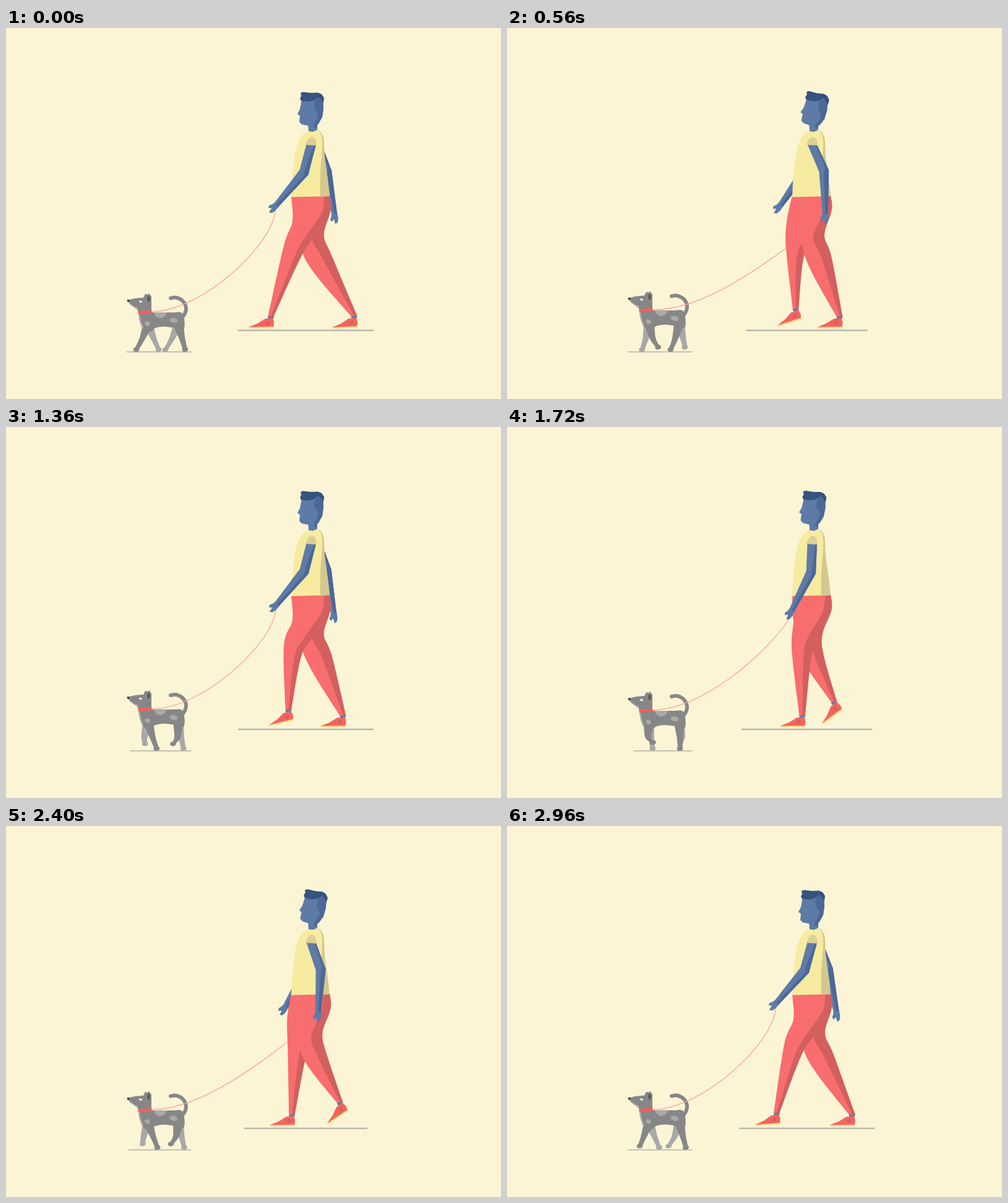
An HTML page with a canvas that plays this animation: 800 by 600 pixels, repeating every 3 s.

```html
<!DOCTYPE html>
<html lang="en">
<head>
<meta charset="utf-8">
<title>Dog walk</title>
<style>
html, body { margin: 0; width: 100%; height: 100%; overflow: hidden; background: #fcf5d5; }
canvas { display: block; }
</style>
</head>
<body>
<canvas id="stage" width="800" height="600"></canvas>
<script>
const ctx = document.getElementById('stage').getContext('2d');
const LOOP = 3000, WALK = 1500, TROT = 1000, DEG = Math.PI / 180;
const C = {
  sky: '#fcf5d5', skin: '#5e7ba6', skinDark: '#4c6898', hair: '#35537f',
  shirt: '#f6eba1', shirtDark: '#d5c88d', sleeve: '#dccf98',
  pants: '#f86d6d', pantsDark: '#d35f5f', shoe: '#f3645f', sole: '#fadb84',
  fur: '#878787', furLight: '#a8a8a7', furDark: '#555', leash: '#f8a59b'
};

const { sin, cos, PI } = Math;
const mix = (a, b, u) => a + (b - a) * u;
// Swing of arms and knees: 1 with the limb in front, -1 behind (for a leg)
const swing = p => cos(2 * PI * (p + .04));

// Foot cycle: x goes 0 to 1 on the ground, then back through the air
function step(phase, early, late) {
  const p = phase % 1, air = p >= .5, u = p * 2 % 1;
  const x = u + (air ? -late : early) * sin(PI * u);
  return { x: air ? 1 - x : x, air: air ? u : 0 };
}

// Adds a smooth curve through the points to the current path
function curve(pts, start) {
  if (start) ctx.moveTo(...pts[0]); else ctx.lineTo(...pts[0]);
  for (let i = 0; i < pts.length - 1; i++) {
    const a = pts[i], b = pts[i + 1], p = pts[i - 1] || a, q = pts[i + 2] || b;
    ctx.bezierCurveTo(a[0] + (b[0] - p[0]) / 6, a[1] + (b[1] - p[1]) / 6,
      b[0] - (q[0] - a[0]) / 6, b[1] - (q[1] - a[1]) / 6, b[0], b[1]);
  }
}
function shape(color, ...curves) {
  ctx.beginPath();
  curves.forEach((c, i) => curve(c, !i));
  ctx.closePath();
  ctx.fillStyle = color;
  ctx.fill();
}
function poly(color, pts) {
  ctx.beginPath();
  pts.forEach(p => ctx.lineTo(...p));
  ctx.closePath();
  ctx.fillStyle = color;
  ctx.fill();
}
function oval(color, x, y, rx, ry, angle = 0) {
  ctx.beginPath();
  ctx.ellipse(x, y, rx, ry, angle, 0, 7);
  ctx.fillStyle = color;
  ctx.fill();
}
function line(color, width, pts) {
  ctx.beginPath();
  curve(pts, true);
  ctx.strokeStyle = color;
  ctx.lineWidth = width;
  ctx.stroke();
}
function placed(x, y, angle, draw) {
  ctx.save();
  ctx.translate(x, y);
  ctx.rotate(angle);
  draw();
  ctx.restore();
}

function drawShoe(x, y, angle) {
  placed(x, y, angle, () => {
    poly(C.skin, [[-5, -2], [5, -2], [4, 3], [-5, 3]]);
    poly(C.sole, [[-36, 16], [4, 14], [4, 18.5], [-36, 18.5]]);
    poly(C.shoe, [[-9, 3], [-4, 3], [3, 1.5], [5, 10], [4, 16], [-36, 16.5], [-22, 11]]);
    oval(C.pantsDark, -5, 10, 3, 3);
  });
}

function drawLeg(phase, near) {
  const { x, air } = step(phase, .09, .05), s = swing(phase);
  const ax = mix(428, 563, x), ay = 467 - 23 * sin(PI * air ** .7);
  const kneeX = 485 - 23 * s, half = 17 - 3 * s;
  const front = [kneeX - half, 367 - 14 * s], back = [kneeX + half, 370];
  const pit = [507 - 7 * s, 335];
  const straight = mix(461, front[0], 39 / (front[1] - 273));
  const thigh = near ? Math.max(463, straight) : straight - 4;

  drawShoe(ax, ay, -36 * DEG * sin(PI * air ** .6));
  const rear = [[ax + 4.5, ay - 1], back, pit, [524, 297], [523, 271]];
  shape(C.pants, [[461, 271], [thigh, 312], front, [ax - 5, ay]], rear);
  shape(C.pantsDark, [[514, 271], [510, 300], [pit[0] - 18, 340],
    [mix(front[0], back[0], .6), 372], [ax, ay - 1]], rear);
}

// Angles are measured forward from straight down
function armAt(x, y, upper, fore) {
  const ex = x - 47 * sin(upper * DEG), ey = y + 47 * cos(upper * DEG);
  return { x, y, ex, ey, fore, wx: ex - 69 * sin(fore * DEG), wy: ey + 69 * cos(fore * DEG) };
}
function drawArm({ x, y, ex, ey, wx, wy, fore }) {
  const bend = Math.atan2(x - wx, wy - y), nx = 8 * cos(bend), ny = 8 * sin(bend);
  const vx = 4.5 * cos(fore * DEG), vy = 4.5 * sin(fore * DEG);
  const back = [[wx + vx, wy + vy], [ex + nx, ey + ny], [x + 7.5, y + 1]];
  placed(wx, wy, (fore + 98) * DEG, () => poly(C.skin,
    [[-3, -4.5], [7, -6], [14, -5], [17, -1], [9, 1], [13, 5], [9, 7], [4, 5], [-3, 4.5]]));
  poly(C.skin, [[x - 8, y], [ex - nx, ey - ny], [wx - vx, wy - vy], ...back]);
  poly(C.skinDark, [[x + 5, y], [ex + 2, ey - 6], [ex, ey + 5], [wx, wy], ...back]);
}

function drawHead(tilt) {
  poly(C.skin, [[488, 150], [489, 167], [496, 168], [503, 165], [503, 150]]);
  poly(C.skinDark, [[492, 158], [503, 150], [503, 163]]);
  placed(494, 161, tilt * DEG, () => {
    ctx.translate(-494, -161);
    poly(C.skin, [[478, 114], [475, 131], [471, 139], [475, 142], [474, 152],
      [478, 156], [488, 158], [498, 160], [506, 153], [511, 144], [513, 130], [512, 112], [500, 108]]);
    poly(C.skinDark, [[500, 110], [512, 112], [513, 130], [511, 144], [505, 155], [499, 160],
      [497, 157], [502, 149], [505, 139], [498, 129]]);
    poly(C.hair, [[476, 105], [480, 103.5], [493, 105], [504, 104.5], [510, 107], [514, 113], [513, 121],
      [509, 115], [504, 111], [497, 117], [488, 119], [477, 118], [475, 114], [477, 110]]);
  });
}

function drawTorso() {
  const right = [[505, 165], [513, 177], [515, 208], [520, 245], [523, 272]];
  shape(C.shirt, [[461, 273.5], [463, 238], [468, 200], [476, 177], [487, 167]],
    [[487, 167], [496, 168], [505, 165]], right);
  shape(C.shirtDark, [[508, 273], [508, 236], [511, 195], [510, 175], [505, 166]], right);
}

function drawPaw(phase, startX, reach, hipX, hipY, color, bend) {
  const { x, air } = step(phase, .25, .15), lift = 10 * sin(PI * air);
  const px = startX + reach * x, py = 520 - lift;
  const kneeX = (px + hipX) / 2 + lift * bend;
  shape(color, [[hipX - 9, hipY], [kneeX - 5, 502], [px - 4, py]],
    [[px + 3.5, py], [kneeX + 5, 502], [hipX + 8, hipY]]);
  oval(color, px - .5, py, 5, 3.8, -.15);
}

function drawDog(phase, bob) {
  const hipY = 480 + bob;
  const frontLeg = (p, color) => drawPaw(p, 211, 36, 230, hipY, color, -.5);
  const rearLeg = (p, color) => drawPaw(p, 258, 32, 279, hipY, color, .3);
  frontLeg(phase + .5, C.furLight);
  rearLeg(phase, C.furLight);
  rearLeg(phase + .5, C.fur);
  frontLeg(phase, C.fur);
  placed(0, bob, 0, () => {
    line(C.fur, 6, [[266, 437], [275, 436], [286, 442], [291, 453], [288, 464], [282, 470]]);
    shape(C.fur, [[214, 459], [216, 473], [220, 484], [226, 491], [234, 491], [242, 485], [256, 483],
      [272, 485], [287, 488], [288, 470], [283, 460], [270, 460], [236, 460]]);
    line(C.furLight, 2.5, [[215, 461], [217, 473], [221, 485]]);
    poly(C.fur, [[196, 440], [209, 437], [222, 436], [225, 430], [229, 431], [231, 429], [235, 434],
      [235, 459], [214, 459], [212, 453], [205, 450], [198, 444]]);
    line(C.furLight, 1.5, [[200, 446], [207, 451], [213, 456]]);
    oval(C.furDark, 230.5, 438, 2, 4.5);
    oval('#333', 197.5, 441, 2, 1.8);
    oval('#fff', 217.5, 442.5, 2.5, 1.5, .3);
    shape(C.furLight, [[239, 460], [243, 467], [250, 469], [257, 466], [260, 460]]);
    oval(C.furLight, 228.5, 478, 4.5, 3.8, .4);
    oval(C.furLight, 271, 473, 6.5, 4, .2);
    poly('#f5605c', [[213, 458], [235.5, 456.5], [236.5, 461], [214, 463]]);
  });
}

function drawLeash(hand, s, bob) {
  ctx.beginPath();
  ctx.moveTo(hand.wx - 2, hand.wy + 10);
  ctx.bezierCurveTo(418 + 13 * s, 372 - 22 * s, 318, 457 + bob / 2, 236, 459 + bob);
  ctx.strokeStyle = C.leash;
  ctx.lineWidth = 1.3;
  ctx.stroke();
}

function drawScene(t) {
  const walk = t / WALK, trot = t / TROT, s = swing(walk);
  const nearArm = armAt(493.5, 188, 21 * s - 5.5, 18 + 23 * s);
  const farArm = armAt(503, 188, 5 - 25 * s, 14 - 25 * s);
  // The dog drops quickly to a low pose at each of the walker's steps
  const bob = 1.6 * (Math.tanh(4 * cos(4 * PI * (walk - .05)) - 1) - 1);

  ctx.fillStyle = C.sky;
  ctx.fillRect(0, 0, 800, 600);
  const half = 102.5 + 6.2 * s;
  line('#b9b6ae', 2.6, [[484.5 - half, 489], [484.5 + half, 489]]);
  line('#b3b1a8', 1.5, [[200 - 5 * cos(4 * PI * trot), 523.7], [299, 523.7]]);

  drawDog(trot, bob);
  drawArm(farArm);
  drawLeash(nearArm, s, bob);
  drawLeg(walk + .5, false);
  drawLeg(walk, true);
  drawTorso();
  drawArm(nearArm);
  shape(C.sleeve, [[484, 189], [488, 180], [494, 176], [500, 180], [502, 190]]);
  drawHead(4.5 * (1 - s));
}

ctx.lineCap = ctx.lineJoin = 'round';
const begin = performance.now();
function frame() {
  drawScene((performance.now() - begin) % LOOP);
  requestAnimationFrame(frame);
}
frame();
</script>
</body>
</html>
```
